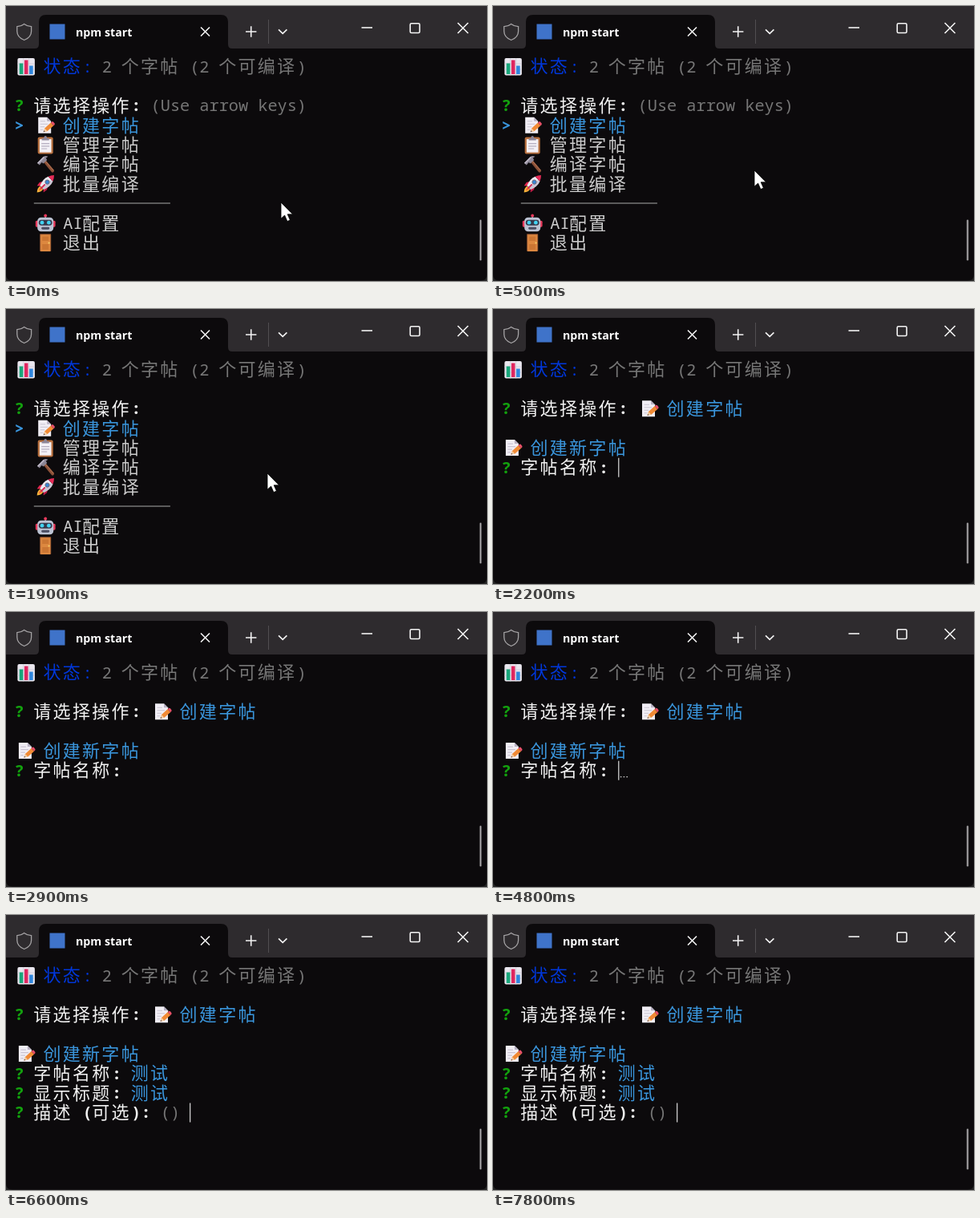
Recreate the animation shown at these times as an HTML page. Size 600 by 343 pixels, loop 8 s.

```html
<!DOCTYPE html>
<html lang="zh-CN">
<head>
<meta charset="utf-8">
<title>npm start</title>
<style>
  html, body { margin: 0; width: 100%; height: 100%; overflow: hidden; background: #262626; }
  svg { display: block; }
  .cjk { font: 400 22px "Noto Sans CJK SC", "Noto Sans CJK", sans-serif; }
  .mono { font: 500 20.25px "Noto Sans Mono", "DejaVu Sans Mono", monospace; }
  .bold .cjk { font-weight: 500; }
  .bold .mono { font-weight: 700; }
  .tab { font: 700 14.2px "Open Sans", "Noto Sans", sans-serif; }
  .icon { fill: none; stroke: #f4f4f4; stroke-width: 1.6; }
</style>
</head>
<body>
<svg width="600" height="343" viewBox="0 0 600 343">
  <defs>
    <symbol id="chart" viewBox="0 0 24 24">
      <rect x="1.5" y="1.5" width="21.5" height="21.5" rx="2" fill="#e9e6ee"/>
      <path d="M1.5 8.5H23M1.5 15.5H23M8.8 1.5V23M15.8 1.5V23" stroke="#cfc9d8" stroke-width=".8"/>
      <rect x="3.8" y="8" width="4.6" height="13.5" fill="#18a77a"/>
      <rect x="10" y="4" width="4.6" height="17.5" fill="#e0265f"/>
      <rect x="16.2" y="11" width="4.6" height="10.5" fill="#2f86dd"/>
    </symbol>
    <symbol id="memo" viewBox="0 0 24 24">
      <path d="M3 2H14L19 7V22H3Z" fill="#f1eef5"/>
      <path d="M14 2V7H19Z" fill="#b9b2c4"/>
      <path d="M5.5 7H12M5.5 10.5H15M5.5 14H11M5.5 17.5H9" stroke="#c9c3d2" stroke-width="1.1"/>
      <path d="M9.5 20.5L11 15.8L18.7 8.8L22.2 12.6L14.4 19.4Z" fill="#f08a35"/>
      <path d="M9.5 20.5L11 15.8L14.4 19.4Z" fill="#f3cfa5"/>
      <path d="M9.5 20.5L10.1 18.6L11.5 20Z" fill="#4b4350"/>
      <path d="M18.7 8.8L20 7.7Q21 7 22 8L23.3 9.6Q24 10.7 23.3 11.5L22.2 12.6Z" fill="#e8506a"/>
    </symbol>
    <symbol id="board" viewBox="0 0 24 24">
      <rect x="2.5" y="2.5" width="19" height="21" rx="2" fill="#b9713f"/>
      <rect x="4.7" y="5" width="14.6" height="16.5" fill="#f4f1f7"/>
      <path d="M7 10.5H17M7 13.7H17M7 16.9H14" stroke="#b5aec0" stroke-width="1.2"/>
      <path d="M7.5 6.5V4H10Q10.2 1 12 1T14 4H16.5V6.5Z" fill="#8d8698"/>
    </symbol>
    <symbol id="hammer" viewBox="0 0 24 24">
      <path d="M9.6 9.3L12.2 6.9L22.6 19.2Q23.2 20.4 22.2 21.4T19.8 21.8Z" fill="#8a5038"/>
      <path d="M11 8.1L12.2 6.9L22.6 19.2L21.7 20Z" fill="#a9694a"/>
      <path d="M1.8 10.2L9.4 2.4Q12 .8 15.2 2.2L12.6 4.2L14 6.6L9.4 11L7.4 9.6L4.6 13Z" fill="#8b8594"/>
      <path d="M1.8 10.2L9.4 2.4L11 3.4L3.2 11.6Z" fill="#bab4c2"/>
    </symbol>
    <symbol id="rocket" viewBox="0 0 24 24">
      <path d="M1.5 22.5Q1.6 17 5.4 14.8L9 18.3Q7.2 22 1.5 22.5Z" fill="#f9b83a"/>
      <path d="M3.4 20.6Q3.8 17.4 6 16L8 18Q6.6 20.2 3.4 20.6Z" fill="#f2683c"/>
      <path d="M8.3 9.2L4.6 10.2L1.5 14.4L6.6 14.6Z" fill="#e0254f"/>
      <path d="M14.8 15.7L13.8 19.4L9.6 22.6L9.4 17.4Z" fill="#c01c46"/>
      <path d="M5.2 14.2Q8.4 5.8 15.4 2.8L21.2 8.6Q18.2 15.6 9.8 18.8Z" fill="#eceaf1"/>
      <path d="M9.8 18.8L7.6 16.6L19.4 6.8L21.2 8.6Q18.2 15.6 9.8 18.8Z" fill="#cbc5d4"/>
      <path d="M15.4 2.8Q19 1.2 22.8 1.2Q22.8 5 21.2 8.6Z" fill="#e62b57"/>
      <circle cx="14.3" cy="9.7" r="2.6" fill="#3a86d6" stroke="#6d6676"/>
      <path d="M6.8 17.2L11 13" stroke="#d92350" stroke-width="1.8" stroke-linecap="round"/>
    </symbol>
    <symbol id="robot" viewBox="0 0 26 24">
      <path d="M13 2.5V6" stroke="#a9a3b3" stroke-width="1.6"/>
      <circle cx="13" cy="2.8" r="1.9" fill="#e83a5c"/>
      <rect x=".6" y="9" width="4" height="8" rx="1.6" fill="#e83a5c"/>
      <rect x="21.4" y="9" width="4" height="8" rx="1.6" fill="#e83a5c"/>
      <rect x="3" y="5" width="20" height="17.5" rx="4.5" fill="#bcc3d3"/>
      <rect x="4.6" y="8" width="16.8" height="7" rx="3.4" fill="#34384c"/>
      <circle cx="8.8" cy="11.5" r="2.4" fill="#42d3f2"/>
      <circle cx="17.2" cy="11.5" r="2.4" fill="#42d3f2"/>
      <rect x="8" y="17" width="10" height="3" rx="1.4" fill="#4a4d62"/>
    </symbol>
    <symbol id="door" viewBox="0 0 24 24">
      <rect x="5" y="1.2" width="14" height="21.8" rx=".8" fill="#9c5a33"/>
      <rect x="6" y="2.2" width="12" height="20.8" fill="#dd8840"/>
      <path d="M8 4.4H16V10H8ZM8 14H16V20.6H8Z" fill="#cb7633"/>
      <circle cx="16.4" cy="12.4" r="1.1" fill="#f6d26b"/>
    </symbol>
  </defs>

  <path d="M0 0H600V335Q600 342.5 592 342.5H8Q0 342.5 0 335Z" fill="#0c0a0c"/>
  <rect width="600" height="53" fill="#2e2b2e"/>
  <path d="M36 53Q41 53 41 48V20Q41 11 50 11H268Q277 11 277 20V48Q277 53 282 53Z" fill="#0c0a0c"/>
  <path d="M22.7 22.4Q26.4 25.4 31.6 25.6V31.5Q31.6 39 22.7 42.5Q13.8 39 13.8 31.5V25.6Q19 25.4 22.7 22.4Z"
        class="icon" style="stroke:#a5a3a5;stroke-width:1.3"/>
  <rect x="54.5" y="22.5" width="19" height="19" fill="#3f73c9"/>
  <text x="87" y="38" class="tab" fill="#fff">npm start</text>
  <g class="icon">
    <path d="M243 26.5L254 37.5M254 26.5L243 37.5"/>
    <path d="M299 32H312.4M305.7 25.3V38.7"/>
    <path d="M340 29.4L345.2 34.4L350.4 29.4"/>
    <path d="M443.5 27H457"/>
    <rect x="504.2" y="21.7" width="11.8" height="11.8" rx="1.5"/>
    <path d="M563.5 21L576.5 34M576.5 21L563.5 34"/>
  </g>
  <path d="M327.5 17V47" stroke="#514e51"/>
  <rect x="590.8" y="266.5" width="2.4" height="51" rx="1.2" fill="#949294"/>
  <g id="screen"></g>
  <path id="mouse" d="M0 0V20.2L4.6 16.1L7.9 23.6L11.4 22L8.2 14.8H14.6Z"
        fill="#fff" stroke="#000" stroke-width=".8"/>
</svg>
<script>
const LOOP = 8000, CELL = 12.15, LEFT = 10.5, PITCH = 24.4, TOP = 75.7;
const GREEN = '#13a10e', CYAN = '#3a96dd', BLUE = '#0037da',
      GREY = '#767676', TEXT = '#cccccc', WHITE = '#f2f2f2';
const screen = document.getElementById('screen');
const mouse = document.getElementById('mouse');

const colX = col => LEFT + col * CELL;
const rowY = row => TOP + row * PITCH;
const isWide = ch => /[\u3000-\u9fff]/.test(ch);

// Place each character on the terminal grid; wide ones take two cells.
function put(row, col, str, fill) {
  let out = '';
  for (const ch of str) {
    const wide = isWide(ch);
    if (ch !== ' ') {
      const x = colX(col) - (wide ? 0.5 : 0), y = rowY(row) + (wide ? 7.6 : 6.8);
      out += `<text class="${wide ? 'cjk' : 'mono'}" x="${x.toFixed(2)}" y="${y.toFixed(2)}" fill="${fill}">${ch === '>' ? '&gt;' : ch}</text>`;
    }
    col += wide ? 2 : 1;
  }
  return out;
}

const bold = content => `<g class="bold">${content}</g>`;

function emoji(row, col, id) {
  const w = id === 'robot' ? 26 : 24;
  return `<use href="#${id}" x="${colX(col) + 14.4 - w / 2}" y="${rowY(row) - 12.2}" width="${w}" height="24"/>`;
}

const caret = (row, col) =>
  `<rect x="${colX(col) - 0.2}" y="${rowY(row) - 12}" width="1.3" height="24" fill="${TEXT}"/>`;

const prompt = (row, label) => bold(put(row, 0, '?', GREEN) + put(row, 2, label, WHITE));

const status = emoji(0, 0, 'chart') + put(0, 3, '状态:', BLUE) +
  put(0, 9, '2 个字帖 (2 个可编译)', GREY);

const items = [
  [3, 'memo', '创建字帖'], [4, 'board', '管理字帖'], [5, 'hammer', '编译字帖'],
  [6, 'rocket', '批量编译'], [8, 'robot', 'AI配置'], [9, 'door', '退出']
];

function menu(selected, hint) {
  let out = prompt(2, '请选择操作:');
  if (hint) out += put(2, 14, '(Use arrow keys)', GREY);
  items.forEach(([row, icon, label], i) => {
    if (i === selected) out += bold(put(row, 0, '>', CYAN));
    out += emoji(row, 2, icon) + put(row, 5, label, i === selected ? CYAN : TEXT);
  });
  return out + `<path d="M${colX(2)} ${rowY(7) - 0.5}h${14 * CELL}" stroke="${GREY}" stroke-width="1.5"/>`;
}

const within = (t, a, b) => t >= a && t < b;

function form(t) {
  let out = prompt(2, '请选择操作:') + emoji(2, 14, 'memo') + put(2, 17, '创建字帖', CYAN) +
    emoji(4, 0, 'memo') + put(4, 3, '创建新字帖', CYAN) + prompt(5, '字帖名称:');
  if (t < 5100) {
    if (!within(t, 2900, 3400) && !within(t, 4000, 4400)) out += caret(5, 12);
    if (t >= 4400) out += `<path d="M${colX(12) + 2.5} ${rowY(5) + 8}h9.5" stroke="${TEXT}" stroke-width="1.3" stroke-dasharray="1.6 2.2"/>`;
    return out;
  }
  out += put(5, 12, '测试', t < 5400 ? TEXT : CYAN);
  if (t < 5400) return out + caret(5, 16);
  out += prompt(6, '显示标题:');
  if (t < 6600) return out + put(6, 12, '(测试)', GREY) + (t < 6000 ? caret(6, 19) : '');
  out += put(6, 12, '测试', CYAN) + prompt(7, '描述 (可选):') + put(7, 15, '()', GREY);
  return out + (within(t, 7200, 7800) ? '' : caret(7, 18));
}

let shown = '';
function draw(t) {
  const picking = t < 2200;
  const view = status + (picking ? menu(within(t, 1500, 1900) ? 5 : 0, t < 1500) : form(t));
  if (view !== shown) screen.innerHTML = shown = view;

  const k = Math.min(Math.floor(t / 100) / 5, 1);
  const ease = k * k * (3 - 2 * k);
  mouse.setAttribute('transform', `translate(${343 - 17 * ease} ${245 - 40 * ease})`);
  mouse.setAttribute('visibility', picking ? 'visible' : 'hidden');
}

const start = performance.now();
function tick() {
  draw((performance.now() - start) % LOOP);
  requestAnimationFrame(tick);
}
tick();
</script>
</body>
</html>
```
